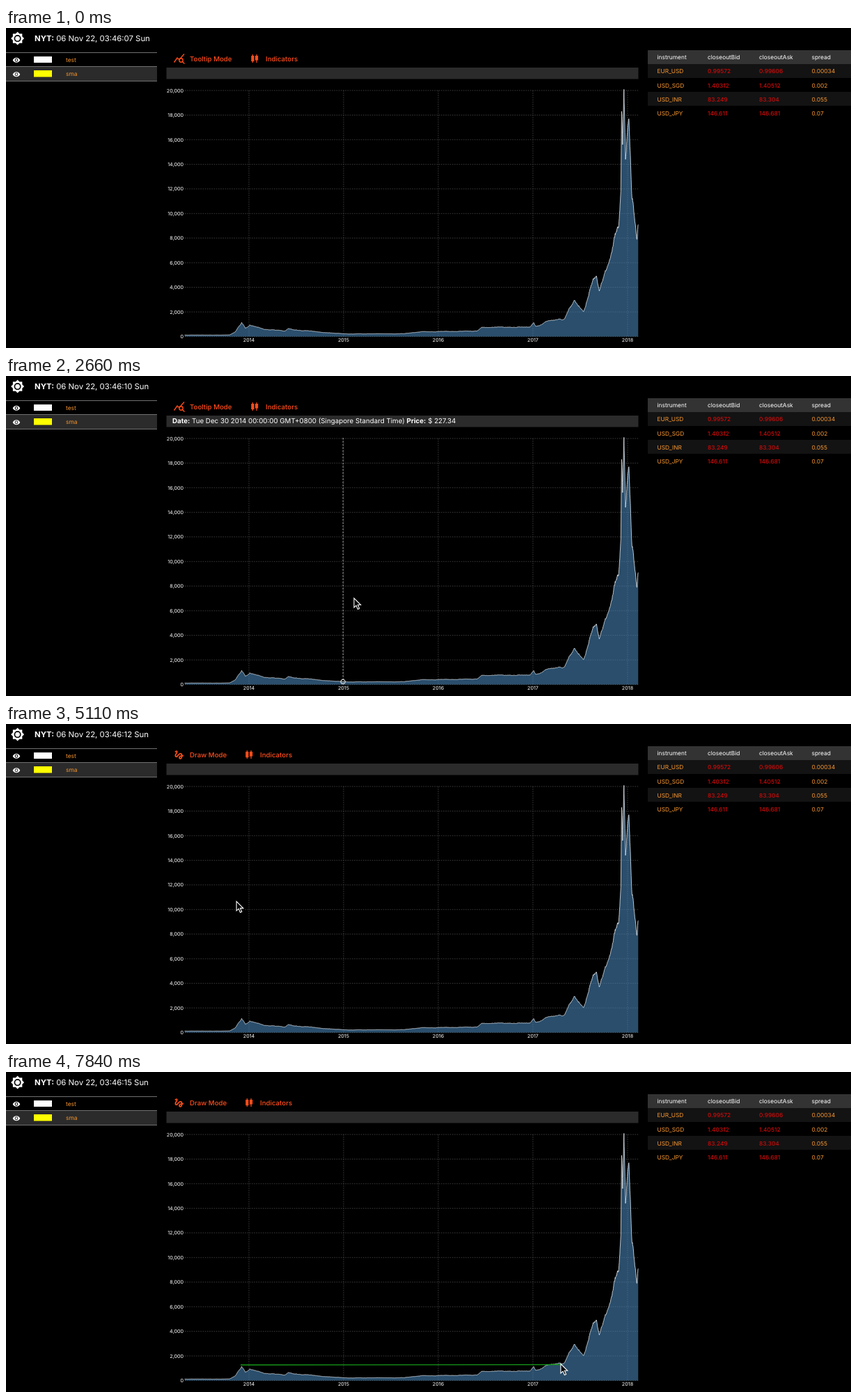
Animation of 1214x461 px, one loop 8 s. Source, as an HTML page:

```html
<!DOCTYPE html>
<html lang="en">
<head>
<meta charset="utf-8">
<title>Price chart</title>
<style>
  html, body { margin: 0; width: 100%; height: 100%; overflow: hidden; background: #000; }
  svg { display: block; width: 1214px; height: 461px; }
  text { font-family: Inter, "Open Sans", sans-serif; fill: #fff; text-rendering: geometricPrecision; white-space: pre; }
  .clock { font-size: 11.35px; }
  .info { font-size: 9.78px; }
  .cell { font-size: 8.4px; }
  .axis { font-size: 7.2px; }
  .tool { font-size: 9.7px; font-weight: 500; fill: #ff4d1a; }
  .bold { font-weight: 700; }
  .amber { fill: #f7962f; }
  .red { fill: #d00a0a; font-weight: 500; }
  .end { text-anchor: end; }
  .mid { text-anchor: middle; }
  .grid { stroke: #4a4a4a; stroke-width: .8; stroke-dasharray: 1.6 1.6; }
  .rule { stroke: #707070; stroke-width: 1; }
  .stroke { fill: none; stroke: #ff4d1a; }
</style>
</head>
<body>
<svg viewBox="0 0 1214 461">
  <defs>
    <path id="eye" fill="#fff" fill-rule="evenodd" d="M12 4.5C7 4.5 2.7 7.6 1 12c1.7 4.4 6 7.5 11 7.5s9.3-3.1 11-7.5c-1.7-4.4-6-7.5-11-7.5zM12 17a5 5 0 1 1 0-10 5 5 0 0 1 0 10zm0-8a3 3 0 1 0 0 6 3 3 0 0 0 0-6z"/>
  </defs>

  <g transform="translate(6.5 5) scale(.84)">
    <path fill="#fff" d="M20 8.7V4h-4.7L12 .7 8.7 4H4v4.7L.7 12 4 15.3V20h4.7l3.3 3.3 3.3-3.3H20v-4.7l3.3-3.3z"/>
    <circle cx="12" cy="12" r="5" fill="#fff" stroke="#000" stroke-width="2"/>
  </g>
  <text class="clock" x="41" y="19.4"><tspan class="bold">NYT:</tspan><tspan id="clock"></tspan></text>

  <rect y="56" width="217" height="20" fill="#2b2b2b"/>
  <path class="rule" d="M0 35.5H217M0 55.5H217M0 76.5H217"/>
  <use href="#eye" transform="translate(9.2 40.5) scale(.48)"/>
  <use href="#eye" transform="translate(9.2 61) scale(.48)"/>
  <rect x="40" y="41" width="26" height="9" fill="#fff"/>
  <rect x="40" y="61" width="26" height="9.5" fill="#ff0"/>
  <text class="cell amber" x="86" y="48.5">test</text>
  <text class="cell amber" x="86" y="69">sma</text>

  <g id="table"></g>

  <rect id="hover" x="231" y="32.5" width="100" height="24" rx="2.5" fill="#330d05"/>
  <g id="tipIcon" class="stroke" stroke-width="1.4">
    <path d="M241.500 49.500L246 43l3 2.500 7-8M253.500 48.500l3 3"/>
    <circle cx="251.5" cy="46.5" r="2.7"/>
  </g>
  <g id="drawIcon" class="stroke" stroke-width="2.5" transform="translate(240.3 36.2) scale(.7)">
    <path d="M3.700 6C7 2.700 9 4.500 7 7.600 5 10.700 4.400 12 4.400 13.500c0 2.500 2.700 2.700 4.300.7C10.500 12 12.300 9 14.600 9c2 0 3 1.500 3 4 0 4.600-1.700 6.600-3.300 6.600-1 0-1.900-.8-1.900-1.900 0-2 2.500-4.200 8.600-4.200"/>
  </g>
  <text id="mode" class="tool" x="264" y="48.2"></text>
  <g id="indicators">
    <path fill="#ff4d1a" d="M352.300 40h1.500v-2h1.200v2h1.500v8h-1.500v2h-1.200v-2h-1.500zM358 40h1.500v-2h1.200v2h1.500v6.500h-1.500v3.500h-1.200v-3.500H358z"/>
    <text class="tool" x="373" y="48.2">Indicators</text>
  </g>
  <rect x="230.5" y="57" width="678" height="16.5" fill="#2b2b2b"/>
  <text id="info" class="info" x="239" y="68.2"><tspan class="bold">Date:</tspan><tspan id="date"></tspan><tspan class="bold">Price:</tspan><tspan id="price"></tspan></text>

  <g id="axes"></g>
  <path id="area" fill="#4682b4" fill-opacity=".6"/>
  <path id="line" fill="none" stroke="#e4eaf0" stroke-width=".8" stroke-linejoin="round"/>

  <g id="cross" fill="none" stroke="#c4c4c4">
    <path d="M0 89V444.500" stroke-width=".8" stroke-dasharray="2.5 2"/>
    <circle id="dot" r="3.2" stroke="#fff"/>
  </g>
  <line id="trend" x1="337" y1="422" stroke="#159a18" stroke-width="1.3"/>
  <path id="arrow" fill="#000" stroke="#fff" stroke-width="1.1" d="M0 0V13.500l3.100-2.900 2.300 5.400 2.300-1-2.300-5.200H9.700z"/>
  <path id="hand" fill="#fff" stroke="#000" stroke-width=".9" stroke-linejoin="round" d="M-1.300.3C-1.300-1.300 1-1.300 1.200.2L2 4.300c.6-.9 2-.7 2.200.4.700-.8 2-.4 2.200.7.800-.5 1.800 0 1.900 1 .3 2.300.1 3.400-.7 5.200l-.2 2H1.200l-.4-1.600C-.3 10.700-1.500 9.300-2.700 7.700c-.7-1.200.7-2 1.700-1.200l.9.900z"/>
</svg>

<script>
const $ = id => document.getElementById(id);
const LOOP = 8000, STEP = 70;
const BASE = 444.5, YEAR = 136, PX_DAY = YEAR / 365.25, PX_PRICE = 354.5 / 20000;
const xOf = day => 349 + day * PX_DAY;
const yOf = price => BASE - price * PX_PRICE;
const label = (cls, x, y, s) => `<text class="${cls}" x="${x}" y="${y}">${s}</text>`;

// Rates table
const columns = [935.5, 1008, 1082, 1157.5];
const rates = `instrument closeoutBid closeoutAsk spread
EUR_USD 0.99572 0.99606 0.00034
USD_SGD 1.40312 1.40512 0.002
USD_INR 83.249 83.304 0.055
USD_JPY 146.611 146.681 0.07`.split('\n').map(row => row.split(' '));
$('table').innerHTML = rates.map((row, r) => {
  const top = 32 + r * 20;
  const fill = r === 0 ? '#333' : r % 2 ? '#131313' : '#000';
  const cells = row.map((s, c) => {
    const tone = r === 0 ? '' : c === 1 || c === 2 ? 'red' : 'amber';
    return label('cell ' + tone, columns[c], 45 + r * 20.25, s);
  }).join('');
  const rule = r < 4 ? `<path class="rule" d="M922 ${top + 20.5}H1214"/>` : '';
  return `<rect x="922" y="${top}" width="292" height="20" fill="${fill}"/>${rule}${cells}`;
}).join('');

// Axes
let axes = '';
for (let v = 0; v <= 20000; v += 2000) {
  const y = yOf(v);
  axes += `<path class="grid" d="M257 ${y}H908.5"/>` +
    label('axis end', 255, y + 2.6, v.toLocaleString('en-US'));
}
for (let i = 0; i < 5; i++) {
  const x = 349 + i * YEAR;
  axes += `<path class="grid" d="M${x} 90V${BASE}"/>` + label('axis mid', x, 452.4, 2014 + i);
}
$('axes').innerHTML = axes;

// Turning points of the price: days since 1 Jan 2014, price
const turns = [
  [-248, 120], [-75, 130], [-53, 370.82], [-28, 1150], [-14, 680], [5, 950], [58, 584.14],
  [140, 450], [152, 650], [278, 350], [378, 220], [600, 235], [672, 410], [880, 450], [897, 740],
  [1085, 780], [1099, 1130], [1107, 820], [1157, 1280], [1216, 1400], [1240, 2400], [1257, 2950],
  [1292, 2050], [1322, 4200], [1340, 4930], [1352, 3700], [1382, 5600], [1406, 7500], [1427, 9000],
  [1435, 11800], [1438, 18300], [1442, 15600], [1447, 20089], [1453, 14400], [1466, 17700],
  [1477, 11600], [1497, 7900], [1502, 9100]
];
let seed = 7;
const random = () => (seed = seed * 16807 % 2147483647) / 2147483647;
const FIRST = turns[0][0], prices = [];

// Midpoint displacement gives the daily jitter between turning points
function fill(d0, p0, d1, p1) {
  const span = d1 - d0;
  if (span < 2) return prices.push(p0);
  const mid = d0 + (span >> 1);
  const mean = p0 + (p1 - p0) * (mid - d0) / span;
  const price = mean * (1 + .018 * (random() - .5) * Math.min(5, Math.sqrt(span)));
  fill(d0, p0, mid, price);
  fill(mid, price, d1, p1);
}
turns.slice(1).forEach((turn, i) => fill(...turns[i], ...turn));
prices.push(turns[turns.length - 1][1]);
const curve = prices.map((p, i) => xOf(FIRST + i).toFixed(2) + ' ' + yOf(p).toFixed(2)).join('L');
$('line').setAttribute('d', 'M' + curve);
$('area').setAttribute('d', `M257 ${BASE}L${curve}V${BASE}Z`);

// Pointer moves: start, end, x, y; it rests in between
const moves = [
  [630, 980, 388.5, 378.5], [1400, 1820, 301, 392], [1820, 2170, 388, 378.5], [2170, 2660, 500, 320],
  [2660, 3220, 329.27, 224], [3360, 3920, 287.5, 45], [4410, 5670, 366, 424],
  [6160, 6230, 335.5, 421], [6370, 7280, 781, 410], [7420, 7840, 797, 420.5]
];
function pointer(t) {
  let x = 400, y = 455;
  for (const [start, end, toX, toY] of moves) {
    const f = Math.min(1, Math.max(0, (t - start) / (end - start)));
    x += (toX - x) * f;
    y += (toY - y) * f;
  }
  return [x, y];
}

const show = (id, on) => $(id).style.display = on ? '' : 'none';
const move = (id, x, y) => $(id).setAttribute('transform', `translate(${x} ${y})`);

function showPrice(day) {
  const price = prices[day - FIRST];
  const [week, date, month, year] = new Date(Date.UTC(2014, 0, 1 + day)).toUTCString().split(' ');
  $('date').textContent = ` ${week.slice(0, 3)} ${month} ${date} ${year} 00:00:00 GMT+0800 (Singapore Standard Time) `;
  $('price').textContent = ` $ ${price.toFixed(2)}`;
  move('cross', xOf(day), 0);
  $('dot').setAttribute('cy', yOf(price));
}

function render(t) {
  const [x, y] = pointer(t);
  const drawMode = t >= 4130;
  const over = y > 32 && y < 57;
  const tracking = t >= 1470 && !drawMode && y > 88;

  const sec = 7 + Math.floor((t + 750) / 1030);
  $('clock').textContent = ` 06 Nov 22, 03:46:${String(sec).padStart(2, '0')} Sun`;

  $('mode').textContent = drawMode ? 'Draw Mode' : 'Tooltip Mode';
  show('tipIcon', !drawMode);
  show('drawIcon', drawMode);
  move('indicators', drawMode ? -8 : 0, 0);
  show('hover', over);

  // The crosshair trails the pointer by one step
  show('info', tracking);
  show('cross', tracking);
  if (tracking) showPrice(Math.round((pointer(t - STEP)[0] - 349) / PX_DAY));

  show('trend', t >= 6440);
  $('trend').setAttribute('x2', x);
  $('trend').setAttribute('y2', y + 1);

  show('arrow', t >= 630 && !over);
  show('hand', over);
  move('arrow', x, y);
  move('hand', x, y);
}

function frame(now) {
  render(Math.floor(now % LOOP / STEP) * STEP);
  requestAnimationFrame(frame);
}
render(0);
requestAnimationFrame(frame);
</script>
</body>
</html>
```
